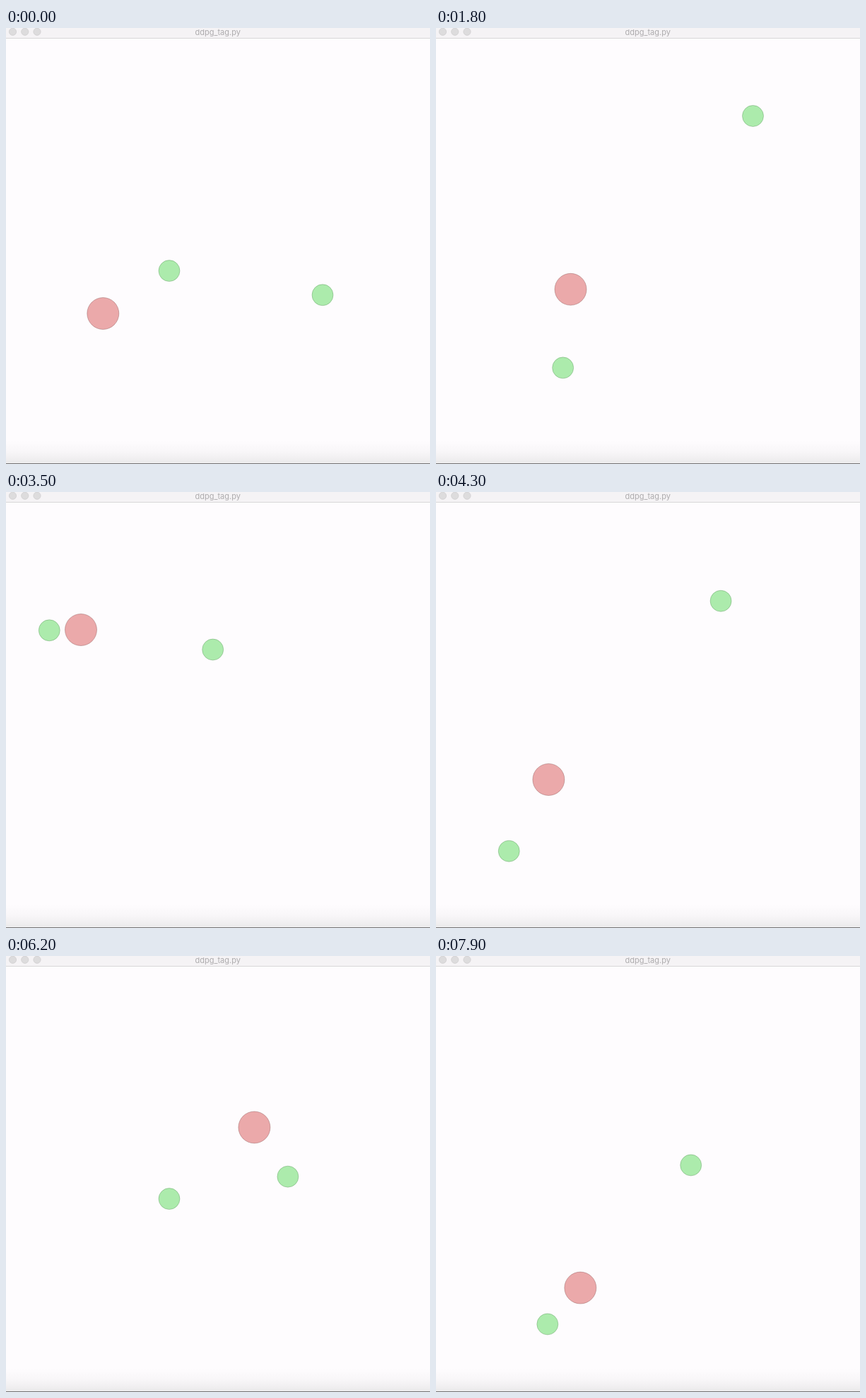
Animation of 600 by 617 pixels, one loop 8000 ms. Source, as an HTML page:

```html
<!DOCTYPE html>
<html lang="en">
<head>
<meta charset="utf-8">
<title>ddpg_tag.py</title>
<style>
  html, body { margin: 0; width: 100%; height: 100%; overflow: hidden; background: #fefcfe; }
  svg { display: block; width: 100vw; height: 100vh; }
  .title { font: 11px Inter, Roboto, sans-serif; fill: #adabad; text-anchor: middle; }
  .button { fill: #dddcdd; stroke: #d0cfd0; stroke-width: .8; }
  .chaser { fill: rgba(217, 89, 89, .5); stroke: rgba(108, 45, 45, .4); stroke-width: .8; }
  .runner { fill: rgba(89, 217, 89, .5); stroke: rgba(45, 108, 45, .35); stroke-width: .8; }
</style>
</head>
<body>
<svg viewBox="0 0 600 617">
  <defs>
    <linearGradient id="shade" x2="0" y2="1">
      <stop offset="0" stop-color="#fefcfe"/>
      <stop offset=".5" stop-color="#f8f6f8"/>
      <stop offset="1" stop-color="#ebeaeb"/>
    </linearGradient>
  </defs>
  <rect width="600" height="617" fill="#fefcfe"/>
  <rect y="584" width="600" height="32" fill="url(#shade)"/>
  <rect y="616" width="600" height="1" fill="#747374"/>
  <rect width="600" height="14" fill="#f5f3f5"/>
  <rect y="14" width="600" height="1" fill="#d8d7d8"/>
  <circle class="button" cx="9.5" cy="5.3" r="5.1"/>
  <circle class="button" cx="26.8" cy="5.3" r="5.1"/>
  <circle class="button" cx="44" cy="5.3" r="5.1"/>
  <text class="title" x="299.7" y="9.6">ddpg_tag.py</text>
  <circle class="chaser" id="chaser" r="22.5"/>
  <circle class="runner" id="low" r="15"/>
  <circle class="runner" id="high" r="15"/>
</svg>
<script>
const LOOP = 8000, STEP = 100;
const meetings = [0, 1, 2.6, 3.5, 5, 6.2, 7.9];

// Each disc passes its stops at the meeting times and drifts along its sway in between.
const discs = {
  chaser: {
    sway: [-25, 25],
    stops: [[137.3, 404], [415, 283.6], [46, 376], [106, 195], [270.5, 513], [351.4, 242.5], [204.3, 469.6]]
  },
  low: {
    sway: [-35, 80],
    stops: [[231, 343.6], [416, 243], [55.3, 462.7], [61.3, 195.8], [232, 548], [231, 343.6], [157.8, 521]]
  },
  high: {
    sway: [55, -70],
    stops: [[448, 377.8], [450, 193], [271, 280], [292.7, 223], [345, 286.8], [398.9, 312.2], [360.7, 296]]
  }
};

const smooth = u => u * u * (3 - 2 * u);

function position({ stops, sway }, t) {
  const next = meetings.findIndex((m, i) => i > 0 && t <= m);
  const span = meetings[next] - meetings[next - 1];
  const u = (t - meetings[next - 1]) / span;
  const swing = span * Math.sin(Math.PI * u) ** 2;
  return sway.map((s, k) => {
    const from = stops[next - 1][k], to = stops[next][k];
    return from + (to - from) * smooth(u) + s * swing;
  });
}

function draw(ms) {
  const t = Math.floor((ms % LOOP) / STEP) * STEP / 1000;
  for (const [id, disc] of Object.entries(discs)) {
    const [x, y] = position(disc, t);
    const circle = document.getElementById(id);
    circle.setAttribute("cx", x.toFixed(2));
    circle.setAttribute("cy", y.toFixed(2));
  }
}

const start = performance.now();
function tick() {
  draw(performance.now() - start);
  requestAnimationFrame(tick);
}
tick();
</script>
</body>
</html>
```
